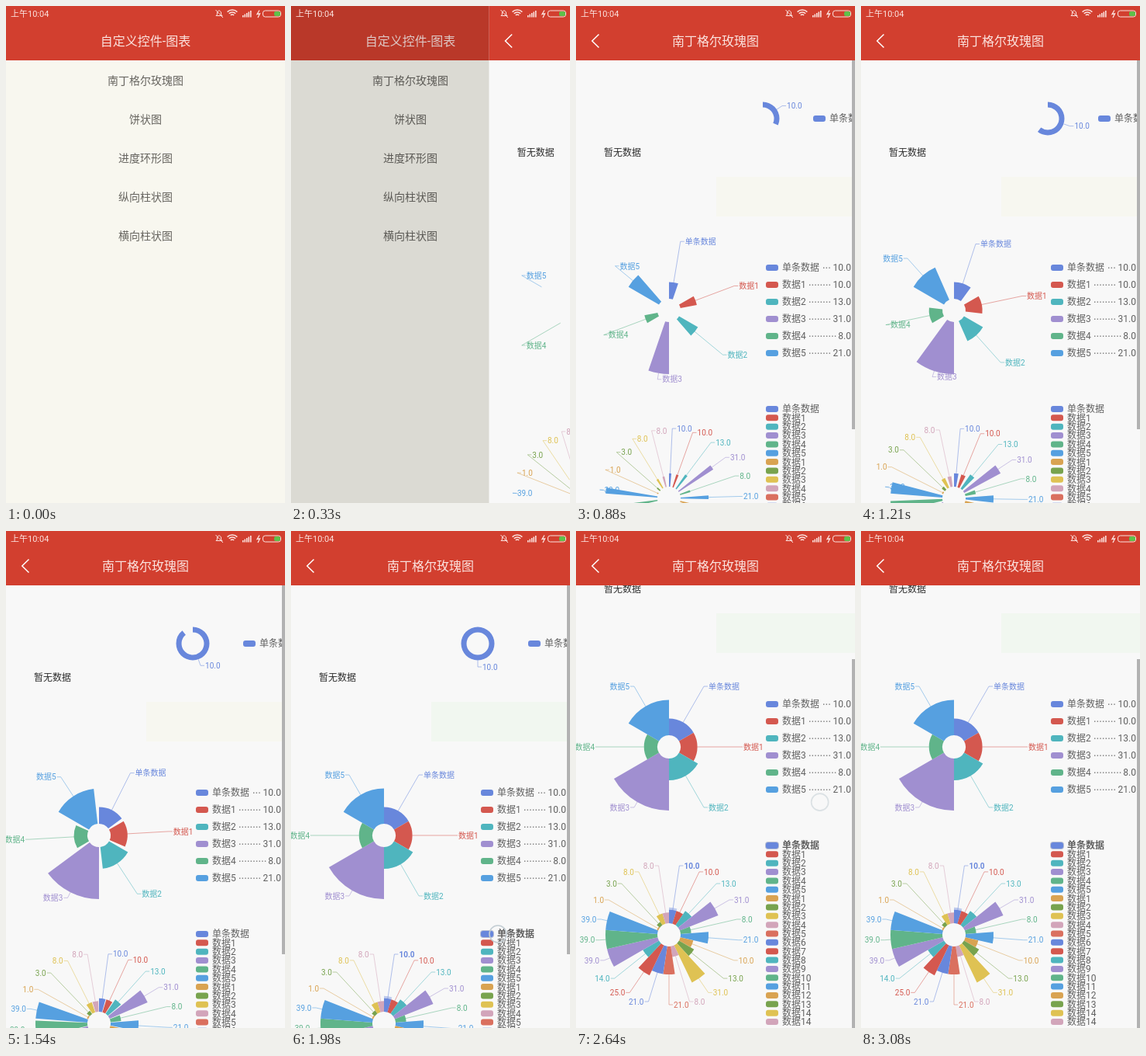
Animation of 360x640 px, one loop 3190 ms. Source, as an HTML page with a canvas:

```html
<!DOCTYPE html>
<html lang="zh">
<head>
<meta charset="utf-8">
<style>
html, body { margin: 0; width: 100%; height: 100%; overflow: hidden; background: #f8f8f8; }
canvas { display: block; width: 360px; height: 640px; }
</style>
</head>
<body>
<canvas id="stage"></canvas>
<script>
const LOOP = 3190, W = 360, H = 640, BAR = 70, MAX_SCROLL = 114, RAD = Math.PI / 180;
const RED = '#d23f2f', PALE = '#fbe3df', GREY = '#606060';
const COLORS = ['#6887dc', '#d4584f', '#4fb5be', '#a08fd0', '#60b48a', '#56a0e0',
  '#d9a352', '#78a34e', '#dfc253', '#d2a5ba', '#da705f'];
const SINGLE = '单条数据';
const MENU = ['南丁格尔玫瑰图', '饼状图', '进度环形图', '纵向柱状图', '横向柱状图'];
const FEW = [10, 10, 13, 31, 8, 21];
const MANY = [10, 10, 13, 31, 8, 21, 10, 13, 31, 8, 21, 21, 25, 14, 39, 39, 39, 1, 3, 8, 8];

const canvas = document.getElementById('stage');
const c = canvas.getContext('2d');
const dpr = window.devicePixelRatio || 1;
canvas.width = W * dpr;
canvas.height = H * dpr;

const clamp = (v, lo = 0, hi = 1) => Math.min(hi, Math.max(lo, v));
const colorOf = i => COLORS[i % COLORS.length];
const fewName = i => i ? '数据' + i : SINGLE;
const manyName = i => i < 6 ? fewName(i) : '数据' + Math.min(i - 5, 14);

function text(str, x, y, size, color, align = 'left', weight = 400) {
  c.font = `${weight} ${size}px Roboto, "Noto Sans CJK SC", "Noto Sans CJK", sans-serif`;
  c.textAlign = align;
  c.fillStyle = color;
  c.fillText(str, x, y + size * 0.37);
}

function rect(x, y, w, h, color) {
  c.fillStyle = color;
  c.fillRect(x, y, w, h);
}

function pill(x, y, w, h, r, color) {
  c.beginPath();
  c.roundRect(x, y, w, h, r);
  c.fillStyle = color;
  c.fill();
}

function path(points, color, width) {
  c.beginPath();
  points.forEach(([x, y]) => c.lineTo(x, y));
  c.strokeStyle = color;
  c.lineWidth = width;
  c.stroke();
}

function circle(x, y, r, color, width, from = 0, to = 360) {
  c.beginPath();
  c.arc(x, y, r, from * RAD, to * RAD);
  c.strokeStyle = color;
  c.lineWidth = width;
  c.stroke();
}

function sector(x, y, inner, outer, from, to, color) {
  c.beginPath();
  c.arc(x, y, outer, from * RAD, to * RAD);
  c.arc(x, y, inner, to * RAD, from * RAD, true);
  c.fillStyle = color;
  c.fill();
}

// Each slice opens clockwise from its own fixed start angle.
function rose(o, p) {
  const { x, y, inner, values, full, reach, label } = o;
  const step = 360 / values.length, max = Math.max(...values);
  values.forEach((v, i) => {
    const from = i * step - 90, to = from + step * p, mid = (from + to) / 2;
    const outer = inner + (full - inner) * v / max;
    const color = colorOf(i), marked = o.marked && i === 0;
    if (marked) sector(x, y, inner, outer + 3, from, to, '#6887dc66');
    sector(x, y, inner, outer, from, to, color);

    const cos = Math.cos(mid * RAD), sin = Math.sin(mid * RAD);
    const side = (i + 0.5) * step * p > 180.01 ? -1 : 1;
    const ax = x + reach * cos, ay = y + reach * sin;
    c.globalAlpha = 0.65;
    path([[x + outer * cos, y + outer * sin], [ax, ay], [ax + side * 5, ay]], color, 0.8);
    c.globalAlpha = 1;
    text(label(v, i), ax + side * 6, ay, 10, color, side < 0 ? 'right' : 'left', marked ? 700 : 400);
  });
}

function legendRow(x, y, i, name, marked) {
  if (marked) pill(x - 1, y - 5, 18, 10, 4, '#b9c0d4');
  pill(x, y - 4, 16, 8, 3, colorOf(i));
  text(name, x + 21, y, 12, GREY, 'left', marked ? 700 : 400);
}

function dots(from, to, y) {
  for (let x = from; x < to; x += 3.65) rect(x, y - 0.5, 1.4, 1.4, '#777');
}

function charts(p, scroll, marked, t) {
  rect(0, BAR, W, H - BAR, '#f8f8f8');
  c.save();
  c.beginPath();
  c.rect(0, BAR, W, H - BAR);
  c.clip();
  c.translate(0, -scroll);

  rect(181, 220, 179, 51, t < 1700 ? '#f7f7f0' : '#f1f7f0');
  text('暂无数据', 36, 189, 12, '#2c2c2c', 'left', 500);
  rose({ x: 241, y: 145, inner: 14.5, full: 21.5, reach: 30, values: [10], label: v => v.toFixed(1) }, p);
  legendRow(306, 145, 0, SINGLE);

  rose({ x: 120, y: 392, inner: 15, full: 82, reach: 90, values: FEW, label: (v, i) => fewName(i) }, p);
  FEW.forEach((v, i) => {
    const y = 337 + i * 22;
    legendRow(245, y, i, fewName(i));
    dots(i ? 301 : 319, v < 10 ? 335 : 328, y);
    text(v.toFixed(1), 355, y, 12, GREY, 'right');
  });

  rose({ x: 120, y: 634, inner: 15, full: 82, reach: 90, values: MANY, marked, label: v => v.toFixed(1) }, p);
  MANY.forEach((v, i) => legendRow(245, 519 + i * 11.35, i, manyName(i), marked && i === 0));
  c.restore();

  rect(356, BAR + scroll * 95 / MAX_SCROLL, 4, 475, '#b2b2b2');
  rect(0, 0, W, BAR, RED);
  text(MENU[0], 180, 45, 16, PALE, 'center');
  path([[29.5, 36.5], [20.8, 45], [29.5, 53.5]], '#fff', 1.5);
}

function menu() {
  rect(0, 0, W, H, '#f8f7ef');
  rect(0, 0, W, BAR, RED);
  text('自定义控件-图表', 180, 45, 16, PALE, 'center');
  MENU.forEach((name, i) => text(name, 180, 96 + i * 50, 14, '#66645f', 'center'));
}

function statusBar() {
  text('上午10:04', 6, 10, 11, PALE);
  // muted bell
  path([[271, 12.5], [272.5, 11], [272.5, 8], [275, 5.5], [277.5, 8], [277.5, 11], [279, 12.5], [271, 12.5]], PALE, 1);
  path([[270.5, 5], [280, 15]], PALE, 1);
  // wifi
  [3, 6, 9].forEach(r => circle(292, 14, r, PALE, 1.5, -135, -45));
  // signal
  for (let i = 0; i < 5; i++) rect(305 + i * 2.5, 12 - i * 1.5, 1.6, 2.5 + i * 1.5, PALE);
  // charging battery
  path([[327, 5.5], [324, 10.5], [327.5, 9.8], [325, 15]], PALE, 1.3);
  c.beginPath();
  c.roundRect(331.5, 6, 23, 8, 3);
  c.strokeStyle = PALE;
  c.lineWidth = 1;
  c.stroke();
  pill(346, 7, 8, 6, 2, '#5fc04a');
}

function draw(t) {
  const slide = clamp((t - 270) / 388);
  const offset = W * (1 - slide) ** 2;
  const grow = clamp((t - 520) / 1145);
  const drag = clamp(t - 2050, 0, 507);
  const scroll = clamp(drag * 0.335 - 17, 0, MAX_SCROLL);

  c.setTransform(dpr, 0, 0, dpr, 0, 0);
  if (slide < 1) {
    c.save();
    c.translate((offset - W) * 0.25, 0);
    menu();
    c.restore();
    rect(0, 0, W, H, `rgba(0,0,0,${0.4 * (1 - offset / W)})`);
    if (offset < W) rect(offset, 0, W, H, '#f8f8f8');
  }
  if (slide > 0) {
    c.save();
    c.translate(offset, 0);
    charts(grow, scroll, t >= 1980, t);
    c.restore();
  }
  statusBar();

  if (t >= 1980 && t < 2750) {
    c.globalAlpha = clamp((2750 - t) / 200);
    circle(267 + drag * 0.094, 519 - drag * 0.335, 11, '#c3cdd3', 1.6);
    c.globalAlpha = 1;
  }
}

const start = performance.now();
function tick() {
  draw((performance.now() - start) % LOOP);
  requestAnimationFrame(tick);
}
tick();
</script>
</body>
</html>
```
